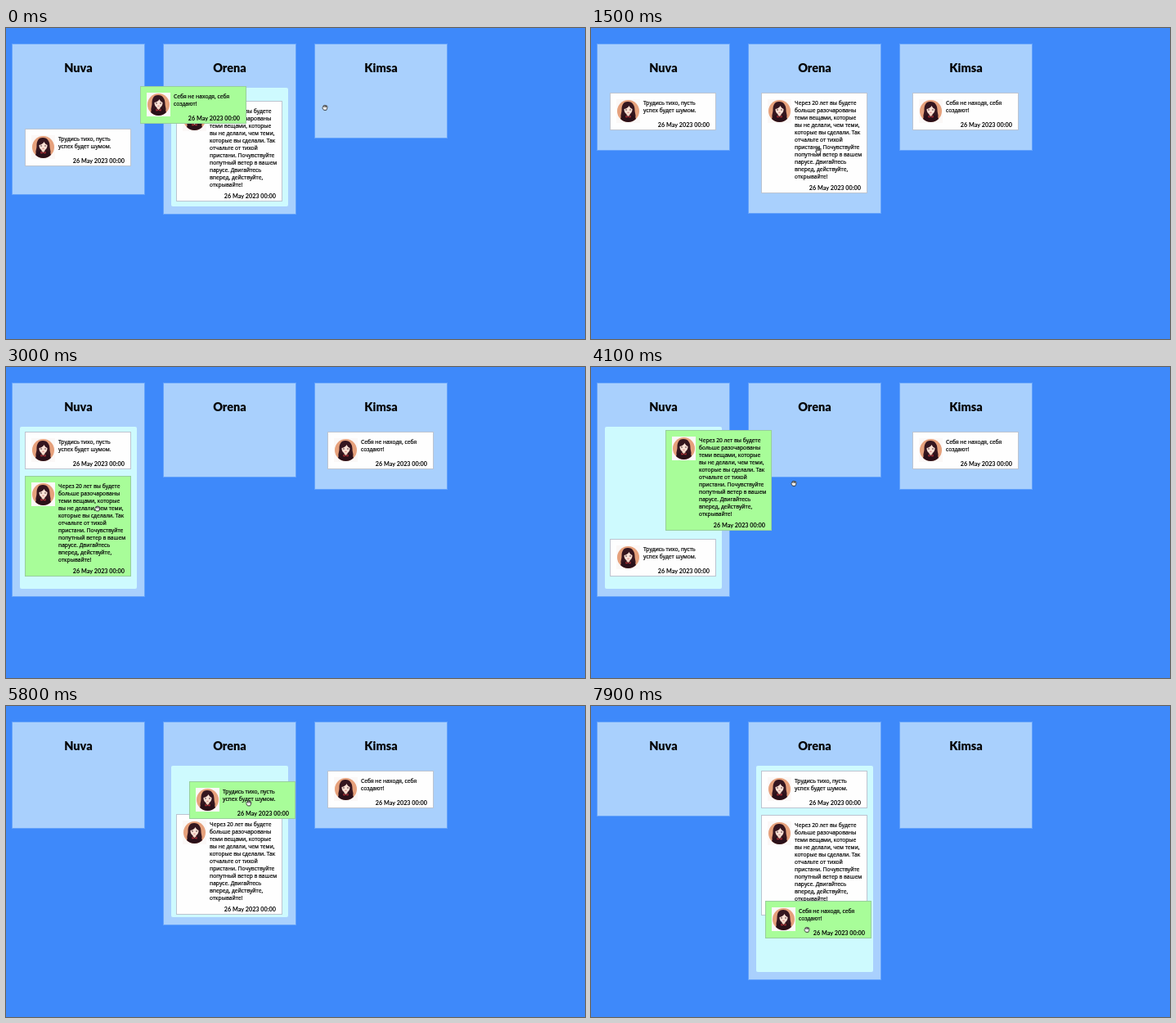
Animation, 708 px wide and 380 px high, one loop 8000 ms. Source, as an HTML page:

```html
<!DOCTYPE html>
<html lang="ru">
<head>
<meta charset="utf-8">
<title>Card board</title>
<style>
  html, body { margin: 0; width: 100%; height: 100%; overflow: hidden; background: #3e89fa; }
  #stage { position: relative; width: 708px; height: 380px; overflow: hidden; color: #050505; }
  .column {
    position: absolute; top: 20px; width: 161px; background: #a9d0fd;
    box-shadow: 0 0 0 1px rgba(169, 208, 253, .35);
  }
  .column h2 {
    margin: 0; position: absolute; top: 19px; width: 100%; text-align: center;
    font: 900 14.5px/20px Lato, sans-serif;
  }
  .list {
    position: absolute; left: 9px; right: 9px; top: 53px; bottom: 9px;
    border-radius: 2px; background: #cefafe;
  }
  .card {
    position: absolute; left: 0; top: 0; width: 130px; box-sizing: border-box;
    border: 1px solid #bcc4d0; background: #fefefe;
  }
  .card.held { background: #a8fd99; border-color: #98cf9c; z-index: 2; }
  .card svg { position: absolute; left: 7px; top: 7px; width: 29px; height: 29px; }
  .card p {
    margin: 0; position: absolute; left: 40px; top: 7px; white-space: pre;
    font: 500 6.65px/9px "Noto Sans", "Open Sans", sans-serif;
    -webkit-text-stroke: .2px;
  }
  .card time {
    position: absolute; right: 7px; bottom: 1px; white-space: pre;
    font: 700 7.25px/9px Lato, sans-serif;
  }
  #cursor { position: absolute; left: -5px; top: -5px; width: 10px; height: 10px; z-index: 3; }
  #cursor path { fill: #f4f4f4; stroke: #333; stroke-width: .9; stroke-linejoin: round; stroke-linecap: round; }
  #cursor .fist, #cursor.grab .open { display: none; }
  #cursor.grab .fist { display: inline; }
</style>
</head>
<body>
<div id="stage">
  <svg width="0" height="0" style="position:absolute">
    <symbol id="face" viewBox="0 0 29 29">
      <path fill="#fbf8f7" d="M0 0h29v29H0z"/>
      <circle cx="14.500" cy="14.500" r="13.500" fill="#e6a17c"/>
      <path fill="#35161f" d="M14 3C8 3 6.500 8 6.500 13S4.500 19 6 23h17c1.500-4-.5-5-.5-10S20 3 14 3z"/>
      <path fill="#2a1019" d="M5 24c1-3.500 4-5 9.500-5s8.500 1.500 9.500 5a13.500 13.500 0 0 1-19 0z"/>
      <path fill="#f3cdbb" d="M12.500 16h4v3.500l-2 1.500-2-1.500z"/>
      <path fill="#fae1d5" d="M9.500 12c3-.5 5-2 6-4 1 2 2 3 4 4 0 4-2 6.500-5 6.500s-5-2.500-5-6.500z"/>
      <path stroke="#35161f" stroke-width=".9" stroke-linecap="round" d="M11.500 13h1M16.500 13h1"/>
      <path stroke="#c2484b" stroke-width=".7" d="M13.500 16.300h2"/>
      <path fill="#a92e36" d="M11 20l3.500 1.500L18 20l-.5 2.500-3-.5-3 .5z"/>
    </symbol>
  </svg>
  <svg id="cursor" viewBox="0 0 10 10">
    <path class="open" d="M3.400 8.800L1.700 6.200Q1.300 5 2.500 5.300L3 5.800 2.500 2.500Q3.200 1.400 3.900 2.400Q4.200.8 5.200 2Q6.200 1.100 6.600 2.500Q7.900 2.100 8 3.600L7.600 6.900 6.900 8.800zM4 2.600l.3 2M5.200 2.200v2.300M6.500 2.600l-.2 2"/>
    <path class="fist" d="M3.400 8L2.100 6.200Q1.700 5 2.600 4.500Q2.500 2.900 3.700 2.900Q4.300 2.100 5.200 2.700Q6.200 2.200 6.700 3Q8 2.900 8 4.400L7.500 6.600 6.900 8zM3.800 3.100l.2 1.400M5.200 2.900v1.500M6.600 3.200l-.1 1.300"/>
  </svg>
</div>
<script>
const LOOP = 8000, STEP = 100, SHIFT = 400, LAG = 100;
const TOP = 20, FIRST = 79, GAP = 8, FOOT = 16, MIN_BOTTOM = 134;
const stage = document.getElementById('stage');
const cursor = document.getElementById('cursor');

const columns = ['Nuva', 'Orena', 'Kimsa'].map((name, i) => ({ name, x: 8 + 185 * i }));
const cards = {
  A: { height: 46, text: 'Трудись тихо, пусть\nуспех будет шумом.' },
  B: {
    height: 123,
    text: 'Через 20 лет вы будете\nбольше разочарованы\nтеми вещами, которые\nвы не делали, чем теми,\nкоторые вы сделали. Так\nотчальте от тихой\nпристани. Почувствуйте\nпопутный ветер в вашем\nпарусе. Двигайтесь\nвперед, действуйте,\nоткрывайте!'
  },
  C: { height: 46, text: 'Себя не находя, себя\nсоздают!' }
};

// Cards in each column from a given time on; while one is held,
// the column it came from keeps room for it
const states = [
  [-800, 'CA|B|', 'C', 0],
  [-40, 'A|CB|', 'C', 0],
  [100, 'A|B|C', 'C', 0],
  [800, 'A|B|C'],
  [1600, 'A|B|C', 'B', 1],
  [1750, 'AB||C', 'B', 1],
  [2300, 'AB||C'],
  [3000, 'AB||C', 'B', 0],
  [3400, 'BA||C', 'B', 0],
  [4150, 'A|B|C', 'B', 0],
  [4500, 'A|B|C'],
  [5000, 'A|B|C', 'A', 0],
  [5450, '|AB|C', 'A', 0],
  [6100, '|AB|C'],
  [6500, '|AB|C', 'C', 2],
  [6700, '|ACB|', 'C', 2],
  [7400, '|ABC|', 'C', 2]
].map(([start, order, held, home]) => ({ start, held, ...layout(order.split('|'), held, home) }));

// Turning points of the pointer: time, x, y
const stops = [
  [-900, 74, 114], [-100, 215, 106], [0, 390, 97], [300, 444, 84], [700, 444, 114],
  [1500, 278, 150], [2000, 93, 204], [2900, 111, 175], [3700, 128, 121], [4000, 179, 119],
  [4100, 248, 142], [4400, 296, 121], [4900, 100, 109], [5400, 270, 78], [5700, 301, 122],
  [6000, 285, 109], [6400, 444, 114], [6900, 277, 131], [7300, 277, 131], [7800, 264, 273]
];

const easeIn = p => p * p;
const easeOut = p => 1 - (1 - p) ** 2;
const smooth = p => p * p * (3 - 2 * p);
const mix = (a, b, p) => a + (b - a) * p;

function layout(order, held, home) {
  const slots = {};
  const bottoms = order.map((ids, i) => {
    let y = FIRST;
    for (const id of ids) {
      slots[id] = [columns[i].x + 15, y];
      y += cards[id].height + GAP;
    }
    if (home === i && !ids.includes(held)) y += cards[held].height + GAP;
    return Math.max(MIN_BOTTOM, y + FOOT);
  });
  return { slots, bottoms, over: order.findIndex(ids => ids.includes(held)) };
}

function pointerAt(t) {
  const i = stops.findIndex(stop => stop[0] > t);
  if (i < 0) return stops[stops.length - 1].slice(1);
  const [from, x, y] = stops[i - 1], [to, x2, y2] = stops[i];
  const p = smooth((t - from) / (to - from));
  return [mix(x, x2, p), mix(y, y2, p)];
}

// Calls step(state, elapsed) for every state begun by time t
function replay(t, step) {
  states.forEach((state, i) => {
    if (state.start > t) return;
    const next = states[i + 1];
    step(state, Math.min(t, next ? next.start : t) - state.start);
  });
}

function bottomAt(i, t) {
  let y = states[0].bottoms[i];
  replay(t, (state, elapsed) => {
    y = mix(y, state.bottoms[i], easeIn(Math.min(1, elapsed / SHIFT)));
  });
  return y;
}

// A held card trails the pointer; the others ease to their slots
function cardAt(id, t) {
  let pos = states[0].slots[id], grip = null;
  replay(t, (state, elapsed) => {
    if (state.held === id) {
      const grabbed = pointerAt(state.start - LAG);
      grip = grip || grabbed.map((v, k) => v - pos[k]);
      pos = pointerAt(state.start + elapsed - LAG).map((v, k) => v - grip[k]);
    } else {
      grip = null;
      const p = easeOut(Math.min(1, elapsed / SHIFT));
      pos = pos.map((v, k) => mix(v, state.slots[id][k], p));
    }
  });
  return pos;
}

function add(className, html) {
  const el = document.createElement('div');
  el.className = className;
  el.innerHTML = html;
  stage.append(el);
  return el;
}

function place(el, [x, y]) {
  el.style.transform = `translate(${x}px, ${y}px)`;
}

for (const column of columns) {
  column.el = add('column', `<div class="list"></div><h2>${column.name}</h2>`);
  column.el.style.left = column.x + 'px';
}
for (const card of Object.values(cards)) {
  card.el = add('card', `<svg><use href="#face"/></svg><p>${card.text}</p><time>26 May 2023 00:00</time>`);
  card.el.style.height = card.height + 'px';
}

function draw(t) {
  const { held, over } = states.filter(state => state.start <= t).pop();
  columns.forEach(({ el }, i) => {
    el.style.height = bottomAt(i, t) - TOP + 'px';
    el.firstChild.style.visibility = i === over ? 'visible' : 'hidden';
  });
  for (const id in cards) {
    cards[id].el.classList.toggle('held', id === held);
    place(cards[id].el, cardAt(id, t).map(Math.round));
  }
  cursor.classList.toggle('grab', Boolean(held));
  place(cursor, pointerAt(t));
}

// The picture advances ten times a second, one screen refresh early
function tick() {
  const t = (performance.now() + 16) % LOOP;
  draw(Math.floor(t / STEP) * STEP);
  requestAnimationFrame(tick);
}
tick();
</script>
</body>
</html>
```
